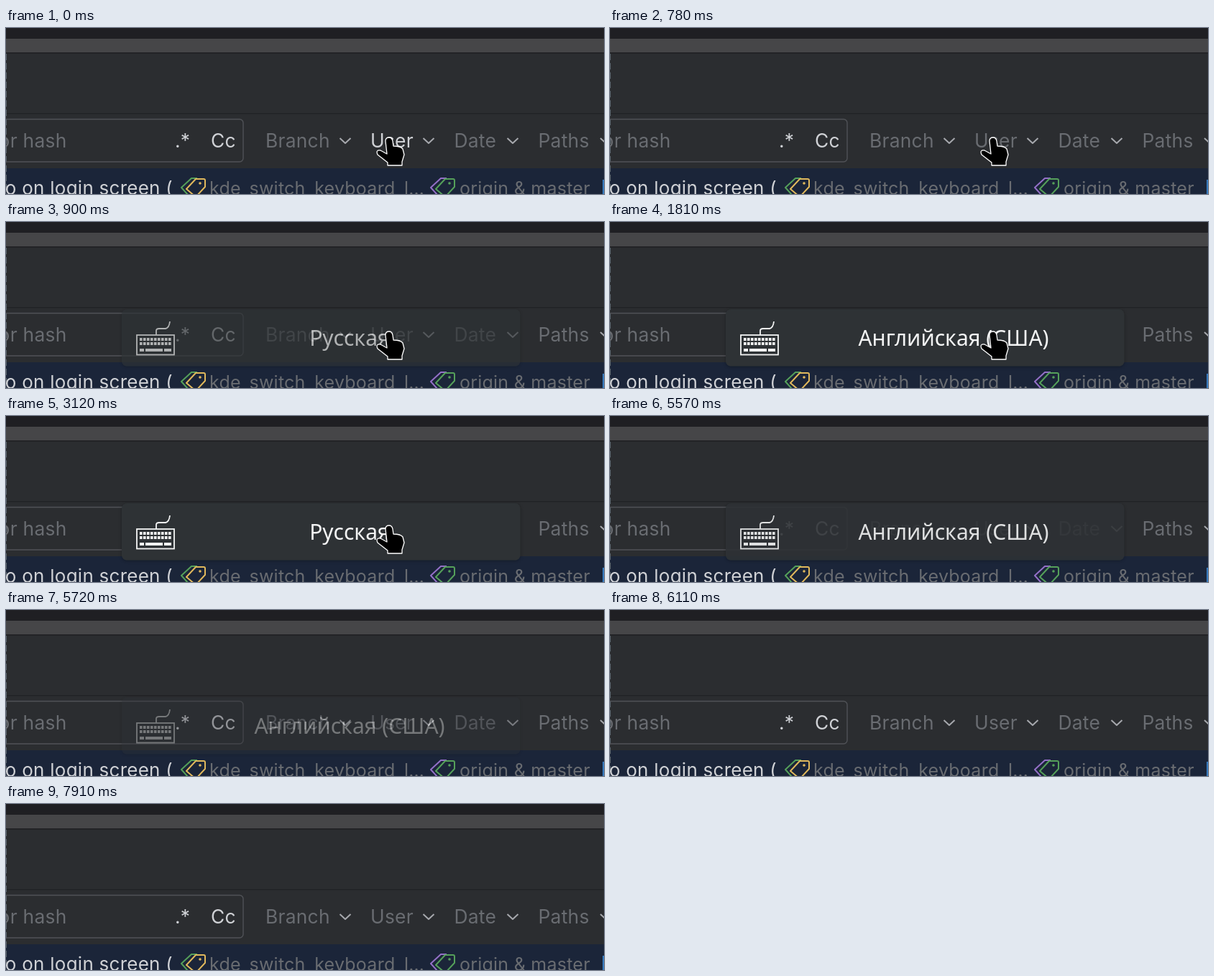
Write an HTML page that moves like this. It is 832x232 px and loops after 8460 ms.

```html
<!DOCTYPE html>
<html lang="en">
<head>
<meta charset="utf-8">
<title>Keyboard layout switch</title>
<style>
  html, body { margin: 0; width: 100%; height: 100%; overflow: hidden; background: #2b2d30; }
  svg { display: block; width: 832px; height: 232px; }

  .ui { font: 26.4px Inter, sans-serif; letter-spacing: .25px; fill: #696c71; }
  .commit { font-size: 26px; }
  .ref { font-size: 25px; }
  .bright { fill: #d0d2d6; }
  .chevron, .outline { fill: none; stroke-width: 2; stroke-linejoin: round; }
  .chevron { stroke: #a6a8ad; }
  .osd { font: 30px "Noto Sans", sans-serif; fill: #f4f5f5; text-anchor: middle; }
  .cursor { fill: #000; stroke: #fff; stroke-width: 1.3; stroke-linejoin: round; }

  .hover, .popup, .russian, .english, .hand, .moved { animation: 8460ms step-end infinite; }
  .hover { animation-name: hover; }
  .popup { animation-name: popup; }
  .russian { animation-name: russian; }
  .english { animation-name: english; }
  .hand { animation-name: hand; }
  .moved { animation-name: moved; }

  @keyframes hover {
    0% { fill: #d0d2d6; }
    9.219%, 100% { fill: #696c71; }
  }
  @keyframes popup {
    0% { opacity: 0; }
    9.219% { opacity: 0; animation-timing-function: steps(6); }
    11.347% { opacity: 1; }
    65.484% { opacity: 1; animation-timing-function: steps(6); }
    67.612% { opacity: .38; animation-timing-function: steps(6); }
    69.739%, 100% { opacity: 0; }
  }
  @keyframes russian {
    0% { opacity: 1; }
    21.394% { opacity: 0; }
    33.333% { opacity: 1; }
    44.917%, 100% { opacity: 0; }
  }
  @keyframes english {
    0% { opacity: 0; }
    21.394% { opacity: 1; }
    33.333% { opacity: 0; }
    44.917%, 100% { opacity: 1; }
  }
  @keyframes hand {
    0% { opacity: 1; }
    57.092%, 100% { opacity: 0; }
  }
  @keyframes moved {
    0% { opacity: 0; }
    57.092% { opacity: 1; }
    60.756%, 100% { opacity: 0; }
  }
</style>
</head>
<body>
<svg viewBox="0 0 832 232">
  <defs>
    <path id="chevron" class="chevron" d="M0 0l7.5 7 7.5-7"/>
    <g id="tag">
      <path class="outline" d="M266 210H258L244 223l9 10" stroke="var(--back)"/>
      <path class="outline" d="M251 225L264 211H275Q277 211 277 213V222L264 236Z" stroke="var(--front)"/>
      <circle cx="270" cy="217" r="1.8" fill="var(--front)"/>
    </g>
    <path id="hand" class="cursor" d="M533 153Q537 153 538 158L539 165Q549 165 552 169L554 177 551 187V192H531V188L517 177Q514 170 521 171L530 176 528 158Q528 153 533 153Z"/>
    <pattern id="keys" x="186" y="162" width="5" height="6" patternUnits="userSpaceOnUse">
      <rect width="3.6" height="4" fill="#f4f5f5"/>
    </pattern>
    <filter id="shadow" x="-5%" y="-20%" width="110%" height="140%">
      <feDropShadow dx="0" dy="1" stdDeviation="2" flood-opacity=".3"/>
    </filter>
  </defs>

  <rect width="832" height="232" fill="#2b2d30"/>
  <rect width="832" height="15" fill="#1f1f23"/>
  <rect y="15" width="832" height="19" fill="#464648"/>
  <rect y="34" width="832" height="2" fill="#222326"/>
  <rect y="119" width="832" height="1.2" fill="#202124"/>
  <rect y="196" width="832" height="36" fill="#1b2539"/>
  <path d="M.5 36V232" stroke="#59636b" stroke-dasharray="9 4"/>

  <rect x="-20" y="127.5" width="350" height="59.5" rx="5" fill="none" stroke="#505257" stroke-width="1.4"/>
  <g class="ui">
    <text x="84.5" y="167" text-anchor="end">Text or hash</text>
    <text class="bright" x="235" y="167">.*</text>
    <text class="bright" x="285" y="167">Cc</text>
    <text x="361" y="167">Branch</text>
    <text class="hover" x="507" y="167">User</text>
    <text x="623.5" y="167">Date</text>
    <text x="740.5" y="167">Paths</text>
  </g>
  <use href="#chevron" x="464.5" y="154"/>
  <use href="#chevron" x="580.5" y="154"/>
  <use href="#chevron" x="697.5" y="154"/>
  <use href="#chevron" x="827" y="154"/>

  <g class="ui">
    <text class="commit bright" x="232" y="233" text-anchor="end">o on login screen (</text>
    <text class="ref" x="283" y="233">kde_switch_keyboard_l…</text>
    <text class="ref" x="631" y="233">origin &amp; master</text>
  </g>
  <use href="#tag" style="--back:#55a05a;--front:#e0b85c"/>
  <use href="#tag" x="347" style="--back:#9470c8;--front:#55a05a"/>
  <path d="M831 212V232" stroke="#3579bd" stroke-width="2"/>

  <g class="popup">
    <rect x="161" y="122" width="554.5" height="79.5" rx="7" fill="#2d3235" filter="url(#shadow)"/>
    <g fill="none" stroke="#f4f5f5" stroke-width="1.8">
      <rect x="182" y="158" width="52" height="27.5"/>
      <path d="M209 158V152Q209 149 213 149H222Q227 148 228 139"/>
    </g>
    <rect x="186" y="162" width="44" height="12" fill="url(#keys)"/>
    <path d="M186 179h6m2 0h24m2 0h10" stroke="#f4f5f5" stroke-width="4"/>
    <text class="osd russian" x="478" y="173">Русская</text>
    <text class="osd english" x="478" y="173">Английская (США)</text>
  </g>

  <use href="#hand" class="hand"/>
  <g class="moved">
    <use href="#hand" x="-9" y="-19"/>
    <path class="cursor" d="M461.5 115V148L468 142 473 152 479 149 475 139 485 137Z"/>
  </g>
</svg>
</body>
</html>
```
